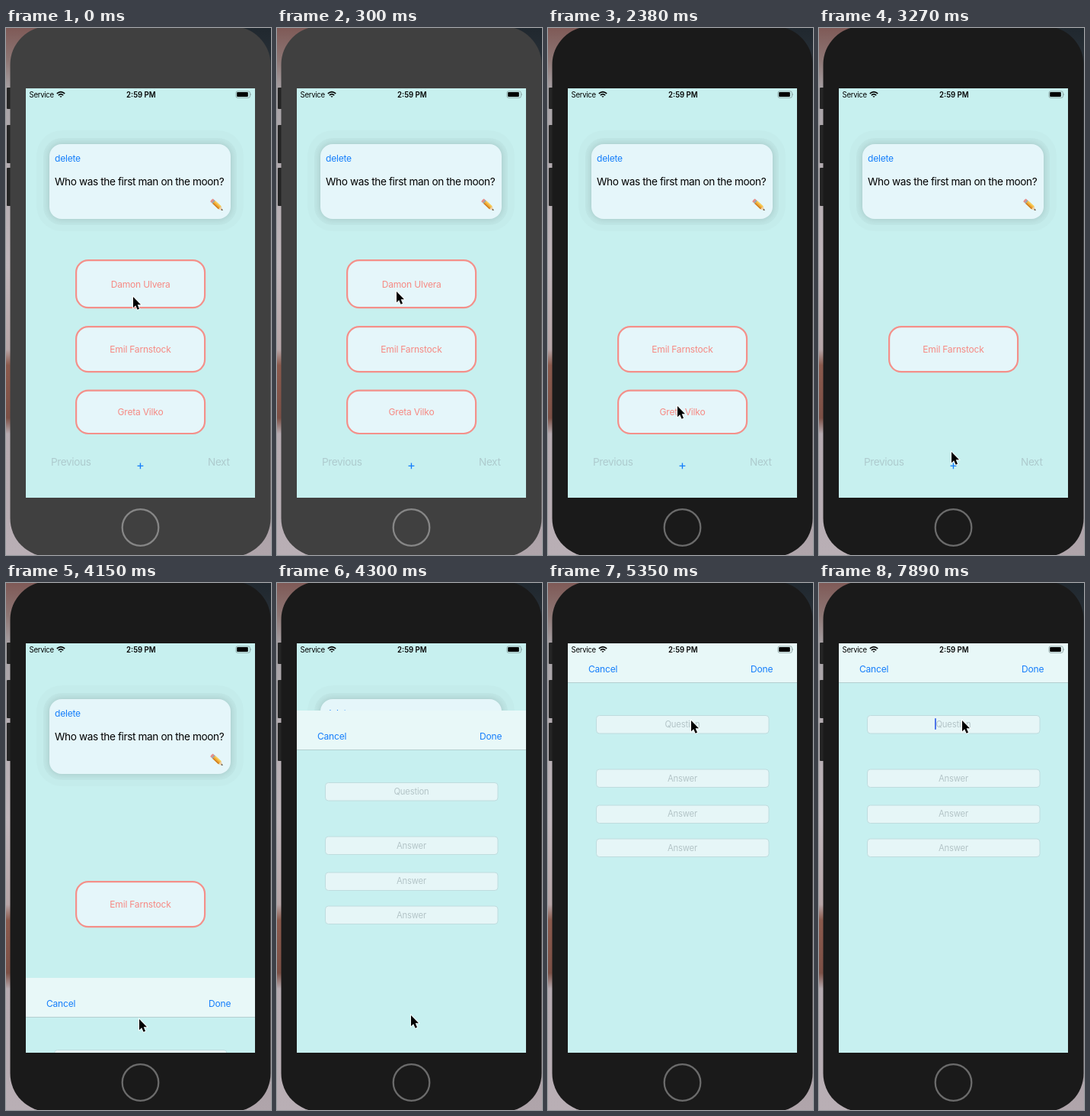
An HTML page for the animation above (8 s loop, 348x690 px).

```html
<!DOCTYPE html>
<html lang="en">
<head>
<meta charset="utf-8">
<title>Quiz app</title>
<style>
  html, body { margin: 0; width: 100%; height: 100%; overflow: hidden; background: #b9b0b6; }
  svg { display: block; width: 348px; height: 690px; }
  text { font-family: Inter, Roboto, "Liberation Sans", sans-serif; font-size: 12.04px; letter-spacing: -.21px; }
  .mid { text-anchor: middle; }
  .link { fill: #157efb; }
  .big { font-size: 13.65px; letter-spacing: -.4px; }
  .off { fill: #aecbce; }
  .hint text { font-size: 11.24px; letter-spacing: -.17px; fill: #b3c4c7; text-anchor: middle; }
  .hint rect { fill: #e6f6f7; stroke: #bfdcde; }
  .status text { font-size: 9.63px; letter-spacing: 0; }
  .answer rect { fill: #e5f6fa; stroke: #f4908a; stroke-width: 2.2; }
  .answer text { fill: #f68a84; text-anchor: middle; }
  .card {
    width: 238px; height: 98px; border-radius: 16px; background: #e5f6fa;
    margin: 30px; box-shadow: 0 0 9px rgba(0,0,0,.15), 0 0 0 8px rgba(0,0,0,.022), 0 -1px 0 17px rgba(0,0,0,.016);
  }

  /* 1% = 80 ms */
  .phone, .first, .third, .plus, .sheet, .caret, .cursor { animation: 8s step-end infinite; }
  .phone { animation-name: phone; }
  .first { animation-name: first; }
  .third { animation-name: third; }
  .plus { animation-name: plus; }
  .sheet { animation-name: sheet; }
  .caret { animation-name: caret; }
  .cursor { animation-name: cursor; }

  @keyframes phone {
    0% { color: #404040; stroke: #868686; }
    11.125%, 100% { color: #1a1a1a; stroke: #6b6b6b; }
  }
  @keyframes first { 0% { opacity: 1; } 13%, 100% { opacity: 0; } }
  @keyframes third { 0% { opacity: 1; } 35.375%, 100% { opacity: 0; } }
  @keyframes plus { 0% { opacity: 1; } 50%, 100% { opacity: .25; } }
  @keyframes caret { 0% { opacity: 0; } 98.625%, 100% { opacity: 1; } }
  @keyframes sheet {
    0% { transform: translateY(540px); }
    51.875% { transform: translateY(438px); }
    53.75% { transform: translateY(88px); }
    55.625% { transform: translateY(12px); }
    57.5% { transform: translateY(1px); }
    59.375%, 100% { transform: none; }
  }
  @keyframes cursor {
    0% { transform: translate(167px, 352px); }
    1.875% { transform: translate(161px, 347px); }
    3.75% { transform: translate(157px, 345px); }
    16.75% { transform: translate(161px, 373px); }
    18.625% { transform: translate(168px, 411px); }
    29.75% { transform: translate(170px, 495px); }
    31.625% { transform: translate(170px, 498px); }
    37.25% { transform: translate(170px, 504px); }
    39.125% { transform: translate(172px, 527px); }
    40.625% { transform: translate(174px, 555px); }
    42.5% { transform: translate(176px, 571px); }
    44.375% { transform: translate(176px, 576px); }
    46.25% { transform: translate(175px, 571px); }
    53.75% { transform: translate(176px, 566px); }
    55.625% { transform: translate(177px, 557px); }
    57.5% { transform: translate(182px, 470px); }
    59.375% { transform: translate(189px, 300px); }
    61.25% { transform: translate(194px, 203px); }
    63.125% { transform: translate(195px, 205px); }
    66.875%, 100% { transform: translate(188px, 180px); }
  }
</style>
</head>
<body>
<svg viewBox="0 0 348 690">
  <defs>
    <linearGradient id="left" x2="0" y2="1">
      <stop offset="0" stop-color="#7f5a57"/>
      <stop offset=".06" stop-color="#8d7674"/>
      <stop offset=".12" stop-color="#a7a2a6"/>
      <stop offset=".45" stop-color="#c0b6bb"/>
      <stop offset=".61" stop-color="#b7a6a8"/>
      <stop offset=".64" stop-color="#8b5a4d"/>
      <stop offset=".74" stop-color="#7c5046"/>
      <stop offset=".77" stop-color="#b6abb1"/>
      <stop offset="1" stop-color="#b9afb5"/>
    </linearGradient>
    <linearGradient id="right" x2="0" y2="1">
      <stop offset="0" stop-color="#20282f"/>
      <stop offset=".2" stop-color="#3a3f46"/>
      <stop offset=".8" stop-color="#a79da3"/>
      <stop offset="1" stop-color="#b0a5ab"/>
    </linearGradient>
    <clipPath id="screen"><rect x="26" y="79" width="301" height="536"/></clipPath>
  </defs>

  <rect width="174" height="690" fill="url(#left)"/>
  <rect x="174" width="174" height="690" fill="url(#right)"/>

  <g class="phone">
    <g fill="#242424" stroke="none">
      <rect x="1" y="78" width="7" height="28" rx="1"/>
      <rect x="1" y="127" width="7" height="50" rx="1"/>
      <rect x="1" y="183" width="7" height="50" rx="1"/>
    </g>
    <rect x="5.5" y="-2" width="342" height="694" rx="50" fill="currentColor" stroke="none"/>
    <circle cx="176.5" cy="654" r="23.8" fill="none" stroke-width="2.3"/>
  </g>

  <g clip-path="url(#screen)">
    <rect x="26" y="79" width="301" height="536" fill="#c7f0ef"/>

    <foreignObject x="27" y="122" width="298" height="160"><div class="card"></div></foreignObject>
    <text class="link" x="64" y="175.3">delete</text>
    <text class="big" x="64" y="206">Who was the first man on the moon?</text>
    <g transform="translate(270 225.3) rotate(43)">
      <path d="M0-2.6h2.6v5.2H0q-1-2.6 0-5.2z" fill="#e58f8c"/>
      <path d="M2.4-2.6h2v5.2h-2z" fill="#9aa3a8"/>
      <path d="M4.2-2.6h10.6v5.2H4.2z" fill="#f0a935"/>
      <path d="M4.2-2.6h10.6v1.7H4.2z" fill="#f8cd55"/>
      <path d="M4.2 1h10.6v1.6H4.2z" fill="#cf7f23"/>
      <path d="M14.8-2.6L20 0l-5.2 2.6z" fill="#edcfa4"/>
      <path d="M17.8-1.1L20.2 0l-2.4 1.1z" fill="#3c3a39"/>
    </g>

    <g class="answer first">
      <rect x="92.1" y="304.1" width="169" height="62" rx="16"/>
      <text x="176.7" y="339.8">Damon Ulvera</text>
    </g>
    <g class="answer">
      <rect x="92.1" y="391.1" width="169" height="59" rx="16"/>
      <text x="176.5" y="425">Emil Farnstock</text>
    </g>
    <g class="answer third">
      <rect x="92.1" y="474.6" width="169" height="56.4" rx="16"/>
      <text x="176.5" y="507.3">Greta Vilko</text>
    </g>

    <text class="big off" x="59" y="573.3">Previous</text>
    <text class="big off" x="265" y="573.3">Next</text>
    <g class="plus"><text class="link mid" x="176.4" y="578" style="font-size:16.5px">+</text></g>

    <g class="sheet">
      <rect x="26" y="79" width="301" height="540" fill="#c7f0f0"/>
      <rect x="26" y="79" width="301" height="51" fill="#e8f8f8"/>
      <rect x="26" y="130" width="301" height="1" fill="#b4cfd0"/>
      <text class="link" x="53" y="117.4">Cancel</text>
      <text class="link" x="266" y="117.4">Done</text>
      <g class="hint">
        <rect x="63.5" y="173.5" width="226.5" height="23.5" rx="4"/>
        <text x="176.5" y="189.1">Question</text>
        <rect x="63.5" y="244" width="226.5" height="23.5" rx="4"/>
        <text x="176.5" y="259.8">Answer</text>
        <rect x="63.5" y="291" width="226.5" height="23.5" rx="4"/>
        <text x="176.5" y="306.3">Answer</text>
        <rect x="63.5" y="335" width="226.5" height="23.5" rx="4"/>
        <text x="176.5" y="350.6">Answer</text>
      </g>
      <rect class="caret" x="152" y="177" width="1.8" height="15" rx=".8" fill="#3f69e8"/>
    </g>

    <g class="status">
      <text x="30.5" y="90.9" style="letter-spacing:-.3px">Service</text>
      <g fill="none" stroke="#000" stroke-width="1.6">
        <path d="M66.8 85.9q5.2-4.6 10.4 0"/>
        <path d="M68.8 88.1q3.2-2.8 6.4 0"/>
        <path d="M70.4 89.2h3.2L72 91z" fill="#000" stroke="none"/>
      </g>
      <text class="mid" x="177.4" y="90.9" font-weight="600">2:59 PM</text>
      <rect x="302" y="82.9" width="18.4" height="8.4" rx="2" fill="none" stroke="#7f9696" stroke-width=".8"/>
      <rect x="303.2" y="84.1" width="14.6" height="6" rx="1" fill="#000"/>
      <path d="M321.3 85.6q1.5 1.5 0 3z" fill="#7f9696"/>
    </g>
  </g>

  <path class="cursor" d="M0 0V14.2L3.2 11.2 5.6 16.7 8 15.7 5.7 10.3H10z"
        stroke="#fff" stroke-width="1.6" paint-order="stroke"/>
</svg>
</body>
</html>
```
